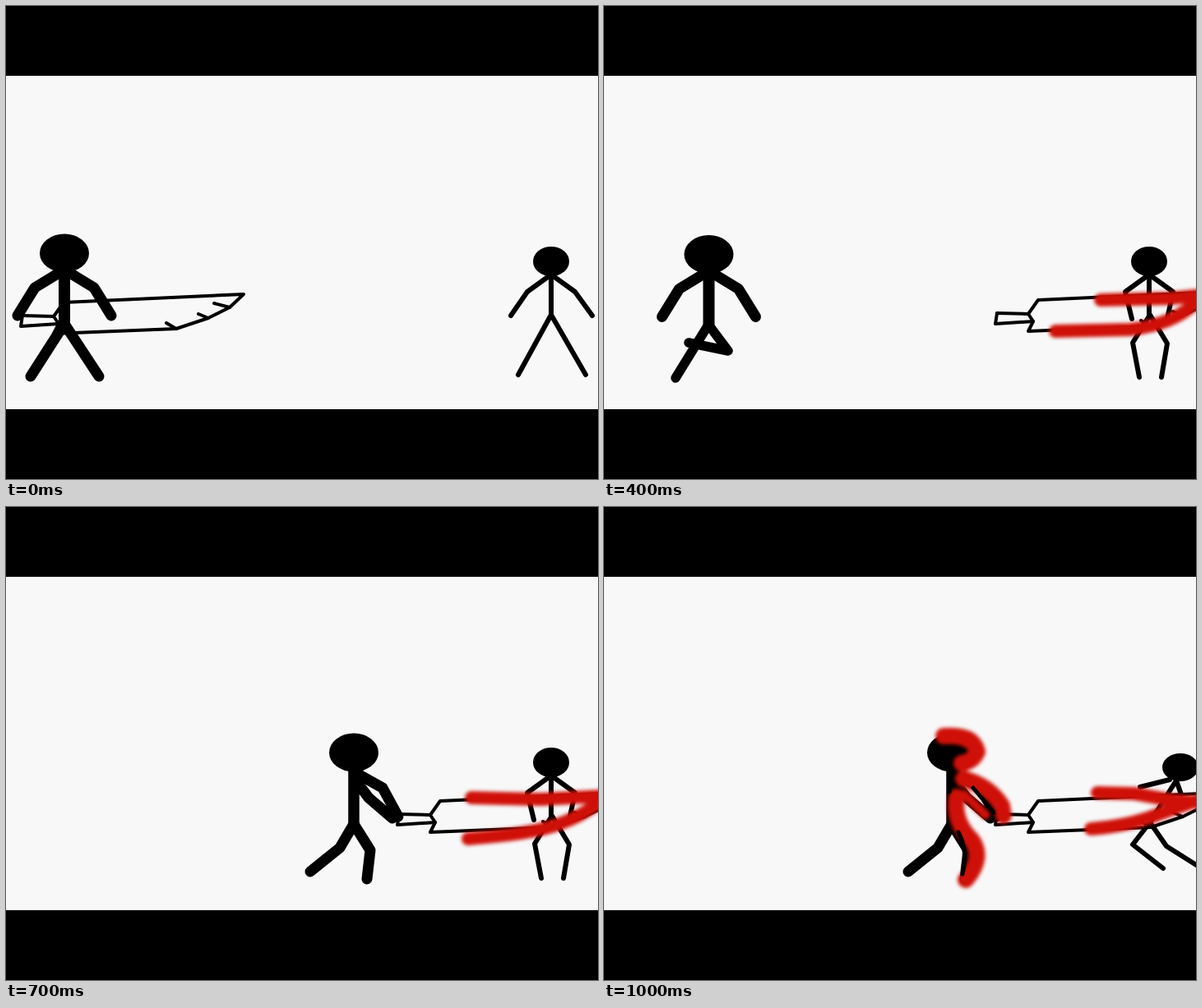
Recreate the animation shown at these times as an HTML page without scripts. Size 720 px wide and 576 px high, loop 1100 ms.

```html
<!DOCTYPE html>
<html lang="en">
<head>
<meta charset="utf-8">
<title>Stick duel</title>
<style>
  html, body { margin: 0; width: 100%; height: 100%; overflow: hidden; background: #000; }
  svg { display: block; width: 100vw; height: 100vh; }
  path { fill: none; }
  .ink { stroke: #000; stroke-linecap: round; stroke-linejoin: round; }
  .thick { stroke-width: 13; }
  .thin { stroke-width: 6; }
  .blade { stroke-width: 4; }
  .blood { stroke: #cf1008; stroke-width: 16; stroke-linecap: round; stroke-linejoin: round; filter: url(#soft); }
  .wide { stroke-width: 20; }
  .halo { stroke: #e6a59e; stroke-width: 22; stroke-linecap: round; stroke-linejoin: round; }
  .core { stroke-width: 15; }
  .smear { filter: url(#smear); }
  .pose {
    visibility: hidden;
    animation: show 1.1s step-end infinite;
    animation-delay: calc(var(--i) * 100ms - 1100ms);
  }
  @keyframes show {
    0% { visibility: visible; }
    9.0909%, 100% { visibility: hidden; }
  }
</style>
</head>
<body>
<svg viewBox="0 0 720 576">
  <defs>
    <filter id="soft" filterUnits="userSpaceOnUse" x="0" y="0" width="800" height="576" color-interpolation-filters="sRGB">
      <feGaussianBlur stdDeviation="2"/>
    </filter>
    <filter id="smear" filterUnits="userSpaceOnUse" x="0" y="0" width="800" height="576" color-interpolation-filters="sRGB">
      <feGaussianBlur stdDeviation="5 0"/>
    </filter>
    <clipPath id="torso"><rect x="560" y="328" width="160" height="77"/></clipPath>
    <clipPath id="shins"><rect x="560" y="405" width="160" height="90"/></clipPath>

    <!-- attacker -->
    <g id="bust">
      <ellipse cx="71" cy="301" rx="30" ry="23.5" stroke="none"/>
      <path d="M71 320V387" stroke-width="14"/>
      <path d="M14 377L35 343 71 321 107 343 128 377"/>
    </g>
    <g id="stand" class="ink thick">
      <use href="#bust"/>
      <path d="M30 451L71 387 113 451"/>
    </g>
    <g id="grip" class="ink thick">
      <ellipse cx="423" cy="299" rx="30" ry="23.5" stroke="none"/>
      <path d="M423 318V386" stroke-width="13.5"/>
      <path d="M424 323L458 342 477 377"/>
      <path d="M426 334L441 354 470 379"/>
      <path d="M370 444L406 415 423 386 443 418 439 453"/>
    </g>

    <!-- victim -->
    <g id="top" class="ink thin">
      <ellipse cx="663" cy="311" rx="22" ry="18" stroke="none"/>
      <path d="M663 326V376"/>
    </g>
    <g id="limbs" class="ink thin">
      <path d="M614 377L634 348 663 327 692 348 713 377"/>
      <path d="M623 449L663 376 705 449"/>
    </g>
    <path id="knees" class="ink thin" d="M651 452L643 410 664 376 685 411 678 452"/>
    <g id="hurt">
      <use href="#top"/>
      <path class="ink thin" d="M642 381L634 348 663 327 692 348 685 381"/>
      <use href="#knees"/>
    </g>
    <g id="bent">
      <g class="ink thin">
        <ellipse cx="701" cy="317" rx="22" ry="17" stroke="none"/>
        <path d="M664 376L694 333"/>
        <path d="M640 372L652 342 694 333 706 360 696 378"/>
      </g>
      <use href="#knees"/>
      <g class="blood">
        <path d="M690 338Q663 342 657 358 652 382 637 387"/>
        <path d="M690 341Q670 366 679 384 688 400 702 408"/>
      </g>
    </g>

    <!-- knife -->
    <g id="knife" class="ink blade">
      <path d="M20 377L58 378 70 361 289 351 272 367 246 380 207 393 58 399 64 387 58 378"/>
      <path d="M20 377L18 390 64 387"/>
      <path d="M207 393L195 386M246 380L234 375M272 367L253 362"/>
    </g>
    <use id="stuck" href="#knife" x="458" y="-3"/>
    <g id="raised">
      <g class="ink blade">
        <path d="M483 374L516 359 510 355V341L686 240 684 262 648 308 523 378 522 366 486 386Z"/>
        <path d="M516 359L522 366M684 262L664 266M669 283L655 283"/>
      </g>
      <path class="blood wide" d="M561 383L565 340Q550 313 560 306L675 245Q683 262 666 280 636 302 614 318L584 345 568 347"/>
    </g>

    <g id="spray">
      <path d="M138 233L240 267 280 283 330 295Q365 306 390 318L460 340Q500 351 556 352"/>
      <path d="M475 287C495 288 505 301 525 309L640 346 686 364"/>
      <path d="M411 361Q430 378 470 380L558 381"/>
      <path d="M232 488L300 479 345 474 400 464 450 452Q500 439 540 416L592 394Q620 386 633 366"/>
      <path d="M645 352L725 347M725 355Q700 384 665 388L575 396"/>
      <path d="M623 403Q598 432 590 450 580 478 592 484L614 489"/>
      <path d="M656 407Q666 442 714 467"/>
    </g>
  </defs>

  <rect y="85" width="720" height="406" fill="#f8f8f8"/>

  <g class="pose" style="--i:0">
    <use href="#knife"/>
    <use href="#stand"/>
    <use href="#top"/><use href="#limbs"/>
  </g>

  <g class="pose" style="--i:1">
    <g class="smear"><use href="#knife" x="151" y="-3"/></g>
    <use href="#stand"/>
    <use href="#top"/><use href="#limbs"/>
  </g>

  <g class="pose" style="--i:2">
    <g class="smear"><use href="#knife" x="302" y="-6"/></g>
    <use href="#stand"/>
    <use href="#top"/><use href="#limbs"/>
  </g>

  <g class="pose" style="--i:3">
    <use href="#stand"/>
    <g class="smear">
      <use href="#stuck"/>
      <g clip-path="url(#torso)"><use href="#top"/><use href="#limbs"/></g>
    </g>
    <g clip-path="url(#shins)"><use href="#limbs"/></g>
    <ellipse cx="663" cy="311" rx="22" ry="18"/>
    <use href="#spray" class="halo"/>
    <use href="#spray" class="blood core"/>
  </g>

  <g class="pose" style="--i:4">
    <g class="ink thick">
      <use href="#bust" x="56.5" y="1.5"/>
      <path d="M87 453L127 388 151 420 103 410" stroke-width="11.5"/>
    </g>
    <use href="#stuck"/>
    <use href="#hurt"/>
    <g class="blood">
      <path d="M604 358L690 356 728 352"/>
      <path d="M549 396L640 394Q695 388 724 357"/>
    </g>
  </g>

  <g class="pose" style="--i:5">
    <g class="ink thick">
      <use href="#bust" x="140" y="2"/>
      <path d="M162 438L196 421 211 390 236 420 206 444" stroke-width="11"/>
    </g>
    <use href="#stuck"/>
    <use href="#hurt"/>
    <g class="blood">
      <path d="M584 356L660 356 728 352"/>
      <path d="M556 400Q640 397 668 388 705 376 725 356"/>
    </g>
  </g>

  <g class="pose" style="--i:6">
    <g class="ink thick">
      <use href="#bust" x="224" y="2"/>
      <path d="M228 429L276 421 295 390 318 422 279 445" stroke-width="11"/>
    </g>
    <use href="#stuck"/>
    <use href="#hurt"/>
    <g class="blood">
      <path d="M566 354L650 356 728 352"/>
      <path d="M562 404Q640 398 670 387 705 375 725 356"/>
    </g>
  </g>

  <g class="pose" style="--i:7">
    <use href="#stuck"/>
    <use href="#grip"/>
    <use href="#hurt"/>
    <g class="blood">
      <path d="M566 354L650 356 728 352"/>
      <path d="M562 404Q640 398 670 387 705 375 725 356"/>
    </g>
  </g>

  <g class="pose" style="--i:8">
    <use href="#raised"/>
    <use href="#grip"/>
    <use href="#bent"/>
    <g class="blood wide">
      <path d="M596 381L598 409M598 444L599 487M564 441L558 453"/>
      <path d="M559 482h3" style="stroke-width:12"/>
    </g>
  </g>

  <g class="pose" style="--i:9">
    <g transform="rotate(-12 480 380)"><use href="#raised"/></g>
    <use href="#grip"/>
    <use href="#bent"/>
    <path class="blood wide" d="M596 430L598 462M560 470L557 486"/>
  </g>

  <g class="pose" style="--i:10">
    <use href="#grip"/>
    <use href="#stuck"/>
    <g class="ink thin">
      <ellipse cx="701" cy="317" rx="22" ry="17" stroke="none"/>
      <path d="M652 341L688 332M664 384L696 333 702 350"/>
      <path d="M680 440L643 411 664 384 684 413 722 437"/>
    </g>
    <g class="blood">
      <path d="M600 348L645 349 690 357 728 360"/>
      <path d="M592 392Q640 388 672 375L728 355"/>
      <path d="M438 350L464 375" style="stroke-width:11"/>
      <g class="wide">
        <path d="M413 279Q449 276 454 298 449 310 435 312"/>
        <path d="M437 331Q468 339 484 364L486 376"/>
        <path d="M429 353Q424 382 447 405 463 427 440 454"/>
      </g>
    </g>
    <path class="ink" d="M420 322V347M431 396Q443 418 436 447M449 342L474 372" stroke-width="5"/>
  </g>

  <path d="M0 0H720V85H0zM0 491H720V576H0z" style="fill:#000"/>
</svg>
</body>
</html>
```
